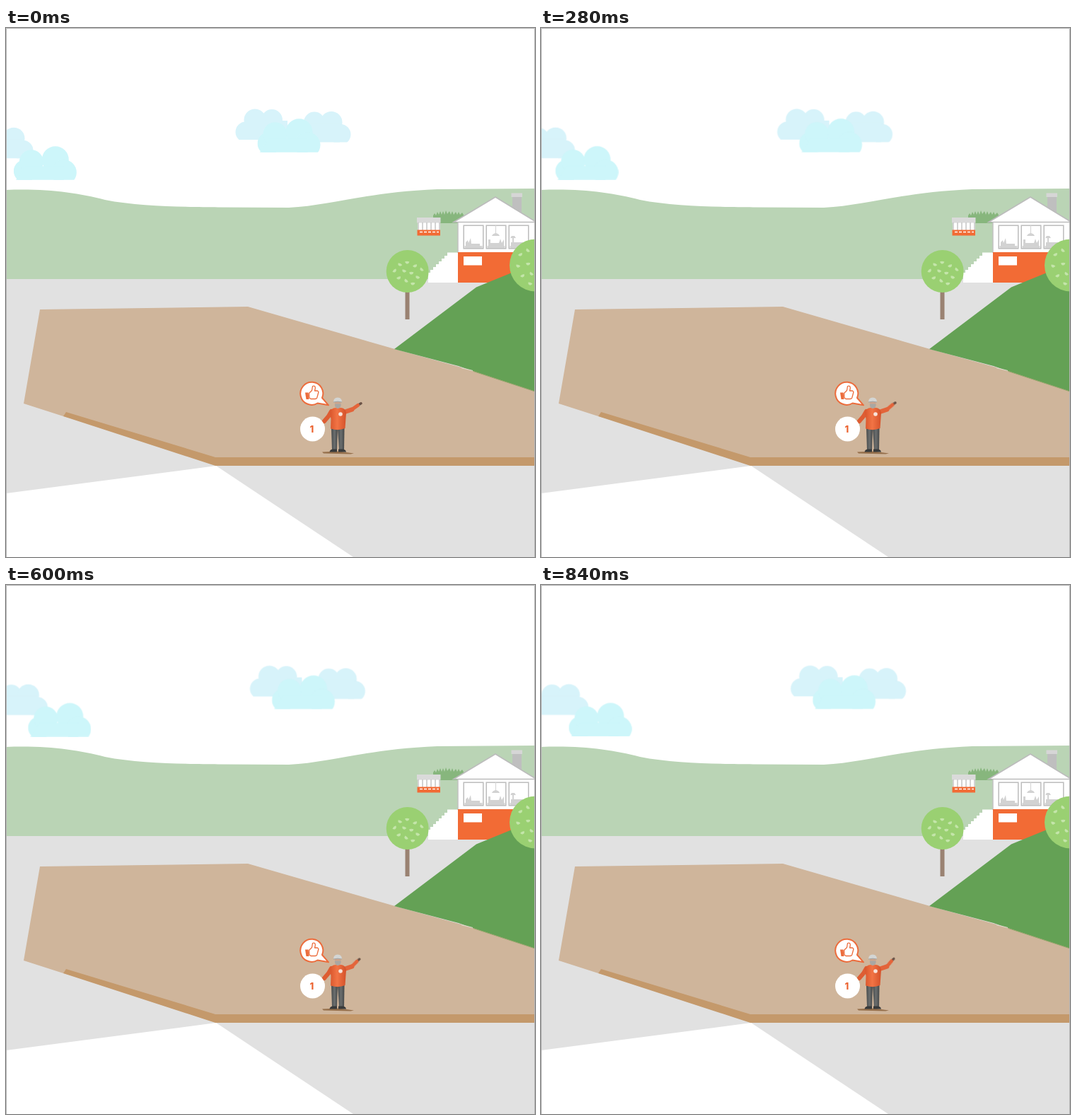
These frames come from a looping animation (748x748 px, 0.88 s). An HTML page:

```html
<!DOCTYPE html>
<html lang="en">
<head>
<meta charset="utf-8">
<title>Building plot</title>
<style>
  html, body { margin: 0; width: 100%; height: 100%; overflow: hidden; background: #fff; }
  svg { display: block; width: 100vw; height: 100vh; }
  .drift { animation: drift 880ms steps(22) infinite; }
  .forearm { transform-origin: 489px 539.5px; animation: wave 880ms steps(22) infinite; }
  @keyframes drift { to { transform: translate(29.9px, -.6px); } }
  @keyframes wave { to { transform: rotate(-13deg) scaleX(.93); } }
</style>
</head>
<body>
<svg viewBox="0 0 748 748">
  <defs>
    <clipPath id="frontCut"><rect y="-1" width="90" height="48.5"/></clipPath>
    <clipPath id="backCut"><rect x="-20" y="-1" width="90" height="44"/></clipPath>
    <g id="front" clip-path="url(#frontCut)" fill="#cdf6fa">
      <circle cx="16" cy="35" r="16"/>
      <circle cx="25" cy="22" r="17"/>
      <circle cx="59" cy="19" r="19"/>
      <circle cx="71" cy="37" r="18"/>
      <path d="M16 28H71V48H3Z"/>
    </g>
    <g id="back" clip-path="url(#backCut)" fill="#d7f3fa">
      <circle cx="14" cy="15" r="15"/>
      <circle cx="38" cy="15" r="15.5"/>
      <circle cx="51" cy="32" r="14.5"/>
      <rect x="-8" y="16" width="58" height="28"/>
    </g>
    <path id="leaf" d="M-3 0Q0 -2 3.2 -1.2Q3 2.5 0 2.5Q-2 2.5 -3 0Z" fill="#c4e5aa"/>
    <g id="pane" fill="none" stroke="#bcbcbc">
      <rect x=".7" y=".7" width="27.6" height="32.6" stroke-width="1.5"/>
      <path d="M2 31H27" stroke="#d4d4d4" stroke-width="3"/>
    </g>
    <linearGradient id="shirt">
      <stop stop-color="#d9562c"/>
      <stop offset=".45" stop-color="#f27445"/>
      <stop offset="1" stop-color="#d4512a"/>
    </linearGradient>
    <linearGradient id="cloth">
      <stop stop-color="#474b4c"/>
      <stop offset=".5" stop-color="#6b6e6e"/>
      <stop offset="1" stop-color="#434647"/>
    </linearGradient>
  </defs>

  <rect width="748" height="748" fill="#fff"/>

  <g class="drift">
    <use href="#back" x="422" y="118.5"/>
    <use href="#back" transform="matrix(-1 0 0 1 390 115)"/>
    <use href="#front" x="355.5" y="128.3"/>
    <use href="#back" x="-27" y="141.3"/>
    <use href="#front" x="10.8" y="167.2"/>
  </g>

  <path d="M0 229C60 227 100 233 140 243C190 253 260 253 300 253.5L400 254C460 251 510 232 610 228L748 227V356H0Z" fill="#bad4b5"/>
  <path d="M0 355H748V748H491L297 619L0 658Z" fill="#e1e1e1"/>

  <!-- plot -->
  <path d="M48 398L342 394L550 454L655 483L748 514V608H296L81 549L25 531Z" fill="#cfb59b"/>
  <path d="M85 543L296 607H748V619H296L81 549Z" fill="#c4996b"/>

  <!-- hut and hedge -->
  <path d="M604 276V265L606 262L608 265L610 260L612 264L614 259L616 264L618 259L620 264L622 258L624 263L627 259L629 264L631 259L633 264L636 260L638 264L640 260L642 264L645 261L648 266V276Z" fill="#87b67d"/>
  <rect x="582" y="275" width="32" height="11" fill="#fff"/>
  <rect x="581" y="268" width="33.5" height="7.5" fill="#dadada"/>
  <path d="M583 275V286M589 275V286M595 275V286M601 275V286M607 275V286M613 275V286" stroke="#bcbcbc" stroke-width="1.3"/>
  <rect x="581.5" y="285.5" width="32.5" height="8" fill="#f26b35"/>
  <path d="M585 288.5H612" stroke="#fff" stroke-width="1.6" stroke-dasharray="4 2"/>

  <!-- house -->
  <path d="M716 238H729V264H716Z" fill="#bfbfbf"/>
  <path d="M714.5 233.5H730V239H714.5Z" fill="#d6d6d6"/>
  <path d="M597 360V346H600V342H604V338H608V334H612V330H616V326H620V322H624V317.500H640V360Z" fill="#fff"/>
  <rect x="639" y="274" width="109" height="44" fill="#fff"/>
  <path d="M639 275V318" stroke="#c2c2c2" stroke-width="1.5"/>
  <path d="M633 274.500L692 239L750 274.500Z" fill="#fff" stroke="#bcbcbc" stroke-width="1.6"/>
  <use href="#pane" x="646.5" y="278.500"/>
  <use href="#pane" x="678.500" y="278.500"/>
  <use href="#pane" x="710.500" y="278.500"/>
  <g fill="#d2d2d2">
    <path d="M650 310V303L653 300L654 304L657 297L658 305H670V310Z"/>
    <path d="M692 279H693V290Q697 291 698 294H687Q688 291 692 290Z"/>
    <path d="M682 310V299H685V304H697L699 298L701 304L704 299V310Z"/>
    <path d="M714 310V303H716V297H713L715 294H719L721 297H718V303H735V310Z"/>
  </g>
  <rect x="639" y="317" width="109" height="43" fill="#f26b35"/>
  <rect x="647" y="323" width="26" height="12.500" fill="#fff"/>

  <!-- bank and trees -->
  <path d="M549 454L665 366.500L714 346.500L748 338V514L660 485L640 478Z" fill="#64a155"/>
  <path d="M644 480.500L660 484.500" stroke="#e2ded2" stroke-width="1"/>
  <path d="M661 485.500L748 514" stroke="#9aa56c" stroke-width="1"/>
  <rect x="564.500" y="370" width="6" height="42" fill="#9a8272"/>
  <circle cx="567.700" cy="344" r="30" fill="#9ad072"/>
  <circle cx="749" cy="335.500" r="37" fill="#9ad072"/>
  <g id="leaves"></g>

  <!-- speech bubble -->
  <path d="M440.500 530.500A16 16 0 1 1 447 523L456 533.300Z" fill="#fff" stroke="#ec6c3c" stroke-width="2" stroke-linejoin="round"/>
  <path d="M423 515.500H427.500L428.500 525H424.500Z" fill="#ec6c3c"/>
  <path d="M428.500 516.500L432.500 512.500L433.500 506.500Q437.500 505 437.300 509.500L436.500 513H440.500Q442.500 514 441.500 516.500L439.700 523Q439 524.500 437 524.500H431L429 523Z" fill="#fff" stroke="#ec6c3c" stroke-width="1.300" stroke-linejoin="round"/>

  <!-- builder -->
  <path d="M447 599.500L470 598.500L492 601.500L487 602.500L449 601.500Z" fill="#96704c"/>
  <path d="M460 566H469L468 597H461Z" fill="url(#cloth)"/>
  <path d="M469 566H478.500L478 597H471Z" fill="url(#cloth)"/>
  <path d="M457.500 599.500Q458 596 462 595.500H468V599.500ZM470 599.500V595.500H476Q480.500 596 481 599.500Z" fill="#383a3b"/>
  <g fill="none" stroke-linecap="round">
    <path d="M460 542L456 549L450 556" stroke="#de5d33" stroke-width="6"/>
    <path d="M477 543.500L489 539.500" stroke="#e3643a" stroke-width="6.500"/>
    <g class="forearm">
      <path d="M499 532.500L502 530.800" stroke="#6a5145" stroke-width="3.400"/>
      <path d="M489 539.500L497.500 533.500" stroke="#e3643a" stroke-width="5"/>
    </g>
  </g>
  <path d="M458 543Q460 537.500 466 537H474Q480 538 481 544L479.500 566Q470 570 459 566.500L459.500 553Z" fill="url(#shirt)"/>
  <rect x="465" y="527" width="8.500" height="10.500" rx="3.500" fill="#cda58d"/>
  <path d="M464.800 531.500H473.500Q474 537 469 538Q465 537 464.800 531.500Z" fill="#a9a7a3"/>
  <path d="M463 529Q463 522.500 469 522.500Q475 522.500 475 529Q469 527.500 463 529Z" fill="#d3d5d4"/>
  <path d="M463 529Q469 527.300 475 529" fill="none" stroke="#a0a3a2"/>
  <circle cx="473" cy="546" r="2.800" fill="#f9e3d9"/>

  <circle cx="433.500" cy="567" r="17.500" fill="#fff"/>
  <text x="432.300" y="571.700" text-anchor="middle" font-family="Inter, sans-serif" font-size="13" font-weight="800" fill="#ec6533">1</text>

  <path d="M.5 748V.5H747.500V748" fill="none" stroke="#b4b4b4"/>
</svg>
<script>
  const leaves = [
    [549, 343], [557, 334], [567, 331], [578, 336], [588, 341], [563, 343], [573, 346],
    [555, 353], [566, 357], [582, 352], [575, 361],
    [727, 320], [738, 314], [724, 336], [738, 333], [730, 350], [743, 347], [741, 361]
  ];
  document.getElementById("leaves").innerHTML = leaves.map(([x, y], i) =>
    `<use href="#leaf" transform="translate(${x} ${y}) rotate(${(i * 67) % 90 - 30})"/>`).join("");
</script>
</body>
</html>
```
